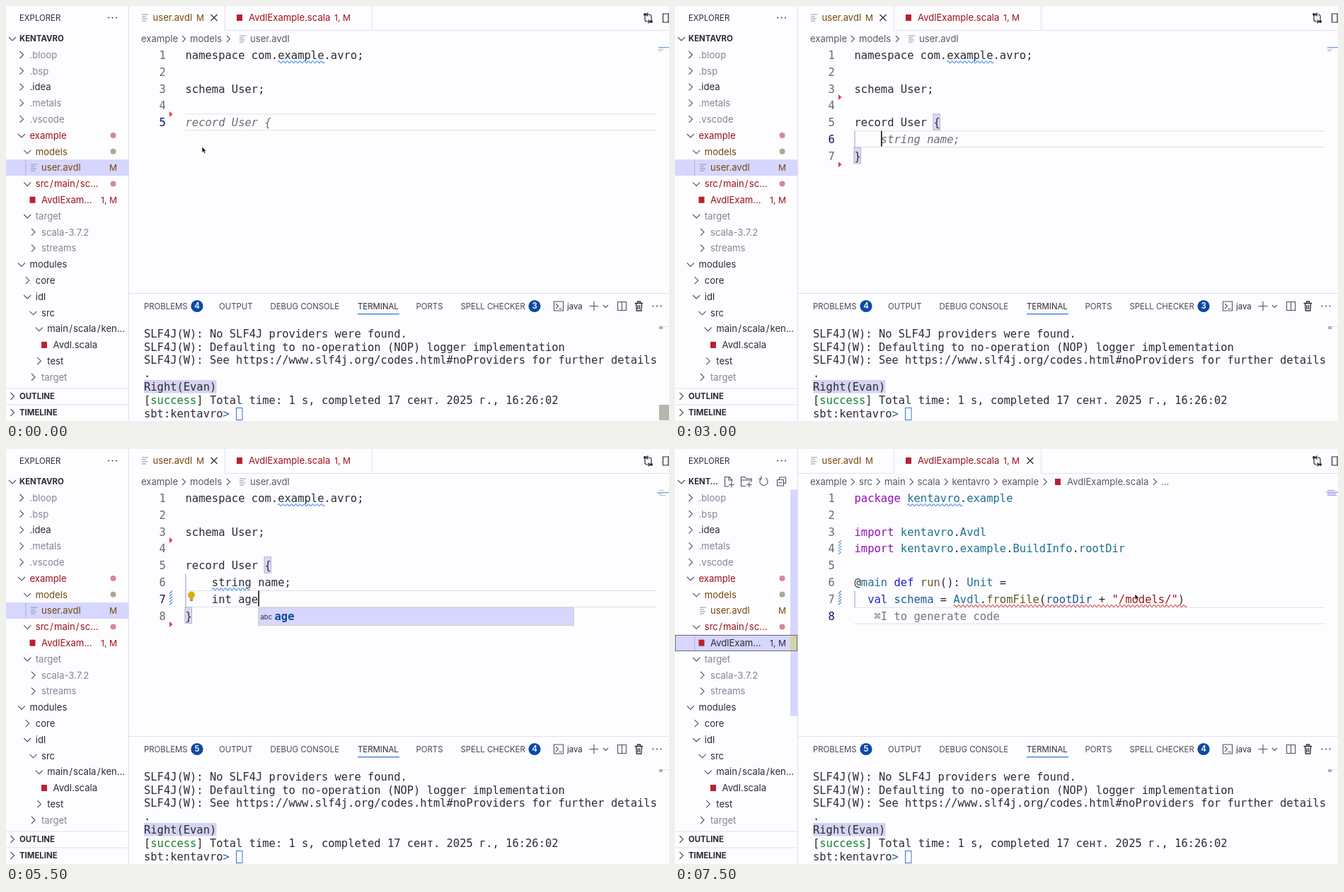
An HTML page for the animation above (8 s loop, 937 by 587 pixels).

```html
<!DOCTYPE html>
<html lang="en">
<head>
<meta charset="utf-8">
<title>Editor session</title>
<style>
html, body { margin: 0; width: 100%; height: 100%; overflow: hidden; background: #fdfdff; }
svg { display: block; width: 937px; height: 587px; }
text { font: 13.1px Inter, sans-serif; fill: #2b2b36; white-space: pre; }
.s { font-size: 11.4px; }
.n { font-size: 12.2px; }
.m { font: 15.5px "DejaVu Sans Mono", monospace; }
.t { font-size: 15.45px; }
.b { font-weight: 700; }
.g { font-style: italic; fill: #6c6c74; }
</style>
</head>
<body>
<svg id="stage" viewBox="0 0 937 587"></svg>
<script>
const INK = '#2b2b36', MUTED = '#848296', RED = '#9c1219', BROWN = '#74480a', EDGE = '#dfdff2',
  SELECT = '#d6d6ff', BLUE = '#3b82f0', ICON = '#50505a', SCALA = '#b8222e';
const CH = 9.33, LEFT = 253.5, ROW = 23.8;

// Drawing helpers
const text = (x, y, s, fill = INK, cls = '') => `<text x="${x}" y="${y}" class="${cls}" style="fill:${fill}">${s}</text>`;
const box = (x, y, w, h, fill, more = '') => `<rect x="${x}" y="${y}" width="${w}" height="${h}" fill="${fill}" ${more}/>`;
const path = (d, stroke = ICON, w = 1.1) => `<path d="${d}" fill="none" stroke="${stroke}" stroke-width="${w}"/>`;
const shape = (d, fill) => `<path d="${d}" fill="${fill}"/>`;
const dot = (x, y, r, fill) => `<circle cx="${x}" cy="${y}" r="${r}" fill="${fill}"/>`;
const span = (fill, s) => `<tspan style="fill:${fill}">${s}</tspan>`;
const ghost = s => `<tspan class="g">${s}</tspan>`;
const chevron = (x, y, open) => path(open ? `M${x - 5} ${y - 2}l5 5 5-5` : `M${x - 2.5} ${y - 5}l5 5-5 5`);
const dots = (x, y) => [-5.5, 0, 5.5].map(d => dot(x + d, y, 1.1, ICON)).join('');
const fileIcon = (x, y) => path(`M${x - 4} ${y - 4.5}h9m-9 3h6m-6 3h8m-8 3h6`, '#92929a', 1);
const scalaIcon = (x, y) => box(x - 4, y - 4.5, 8, 9, SCALA);
const cross = (x, y) => path(`M${x - 4.5} ${y - 4.5}l9 9m0-9l-9 9`, INK, 1.2);
const lineTop = n => 57.7 + ROW * n;
const colX = c => LEFT + CH * c;

function wave(row, from, to, color) {
  let d = `M${colX(from)} ${lineTop(row) + 21.5}`;
  for (let x = colX(from); x < colX(to) - 2; x += 6) d += 'q1.5-3 3 0t3 0';
  return path(d, color, 1.1);
}

function badge(x, n) {
  return dot(x, 424.5, 8.6, '#0b4aa4') + `<text x="${x}" y="428.4" text-anchor="middle" class="s" style="fill:#fff;font-weight:600">${n}</text>`;
}

function bulb(x, y) {
  return dot(x, y - 1.5, 5, '#d9b010') + box(x - 2.5, y + 1.5, 5, 3, '#d9b010') + box(x - 2, y + 4.7, 4, 2, '#77755f');
}

function hatch(row) {
  let d = '';
  for (let y = lineTop(row) + 4; y < lineTop(row + 1); y += 4) d += `M231 ${y}l4-4`;
  return path(d, '#5a94cc', 1.3);
}

function pointer(x, y) {
  return `<path d="M${x} ${y}v8.5l2-1.7 1.5 3 1.5-.8-1.4-2.8h2.6z" fill="#111" stroke="#fff" stroke-width=".7"/>`;
}

// Explorer rows: level, label, kind (> closed, v open, f text file, s scala file), colour, mark
const TREE = [
  [0, '.bloop', '>', MUTED], [0, '.bsp', '>', MUTED], [0, '.idea', '>'], [0, '.metals', '>', MUTED],
  [0, '.vscode', '>', MUTED], [0, 'example', 'v', RED, '#d68898'], [1, 'models', 'v', BROWN, '#aaaa96'],
  [2, 'user.avdl', 'f', BROWN, 'M'], [1, 'src/main/sc…', 'v', RED, '#d68898'],
  [2, 'AvdlExam…', 's', RED, '1, M'], [1, 'target', 'v', MUTED], [2, 'scala-3.7.2', '>', MUTED],
  [2, 'streams', '>', MUTED], [0, 'modules', 'v'], [1, 'core', '>'], [1, 'idl', 'v'], [2, 'src', 'v'],
  [3, 'main/scala/ken…', 'v'], [4, 'Avdl.scala', 's'], [3, 'test', '>'], [2, 'target', '>', MUTED]
];

function explorer({ selected = 7, hover, tools, bar, focus }) {
  let out = text(19, 20.6, 'EXPLORER', INK, 's') + dots(150.5, 16.5) + chevron(9, 46, true) +
    text(19, 50.2, tools ? 'KENT…' : 'KENTAVRO', INK, 's b');
  if (tools) out += path('M76 53h-5.5v-13.5h6l4 4v3m-4.5-7v4.5h4.5M76 50.5h7.5m-3.7-3.7v7.5') +
    path('M100 52.5h-6.5v-13h5l2 2.5h7.5v5M93.5 44h14.5M101 50.5h7.5m-3.7-3.7v7.5') +
    path('M122 41.5a5.6 5.6 0 1 0 6-.5M122 38v4h-4') +
    path('M147.5 43v-3h9v8.5h-3M144.5 43.5h9v8.5h-9zM146.5 47.8h5');
  if (hover) out += box(0, 263, 163, 22.8, '#f3f3fb');
  out += box(0, 57.6 + 22.8 * selected, 173, 22.8, SELECT);
  TREE.forEach(([level, label, kind, color = INK, mark], i) => {
    const x = 33.5 + 8.25 * level, y = 69 + 22.8 * i, fill = focus && i === selected ? INK : color;
    for (let j = 0; j < level; j++)
      if (hover || (i === selected && j === 1)) out += box(19 + 8.25 * j, y - 11.4, 1, 22.8, i === selected && j ? '#b4b4cc' : EDGE);
    out += kind === 'f' ? fileIcon(x - 11, y) : kind === 's' ? scalaIcon(x - 12.5, y) : chevron(x - 11.5, y, kind === 'v');
    out += text(x, y + 4.7, label.replaceAll('/', '\u200a/\u200a'), fill);
    if (mark) out += mark[0] === '#' ? dot(151.5, y, 4, mark)
      : `<text x="157" y="${y + 4.5}" text-anchor="end" class="n" style="fill:${fill}">${mark}</text>`;
  });
  if (bar) out += box(163, 57.5, 10, 320, bar);
  if (focus) out += box(163, 263, 10, 22.5, '#d4d2aa') + box(.5, 263.5, 172, 22, 'none', 'stroke="#6c6c7c"');
  [['OUTLINE', 552], ['TIMELINE', 575]].forEach(([s, y]) =>
    out += box(0, y - 11.5, 173, 1, EDGE) + chevron(9, y, false) + text(19, y + 4.2, s, INK, 's b'));
  return out + box(173, 0, 1, 587, EDGE);
}

function tabs(scala) {
  let out = box(309, 0, 1, 34, EDGE) + box(517, 0, 1, 34, EDGE) + box(517, 34, 420, 1, EDGE) +
    (scala ? box(174, 34, 135, 1, EDGE) : box(309, 34, 208, 1, EDGE)) +
    fileIcon(196, 16.5) + text(207.5, 21.2, 'user.avdl', BROWN) + text(269, 21.2, 'M', BROWN, 'n') +
    scalaIcon(330, 16.5) + text(343, 21.2, 'AvdlExample.scala', RED) + text(464, 21.2, '1, M', RED, 'n') +
    cross(scala ? 502 : 294, 16.5) +
    path('M903 14v5q0 3 3 3h4m-2.5-2.5l2.5 2.5-2.5 2.5M912 20v-5q0-3-3-3h-4m2.5-2.5l-2.5 2.5 2.5 2.5', INK, 1.2) +
    dot(903, 12, 2, INK) + dot(912, 22, 2, INK) + path('M938 11h-9.5v12h9.5m-2-12v12', INK, 1.2);
  const crumb = '#585864';
  const parts = scala
    ? [[191, 'example'], [260, 'src'], [296, 'main'], [342.5, 'scala'], [391.5, 'kentavro'], [462, 'example'], [554, 'AvdlExample.scala'], [687, '…']]
    : [[191, 'example'], [260, 'models'], [345, 'user.avdl']];
  parts.forEach(([x, s]) => out += text(x, 51.2, s, crumb));
  (scala ? [251, 287, 334, 383, 453, 523, 678] : [251, 314]).forEach(x => out += path(`M${x - 2} 42l4.5 4.5-4.5 4.5`, crumb));
  return out + (scala ? scalaIcon(541, 46.5) : fileIcon(334, 46.5));
}

function minimap(kind) {
  if (kind === 2) return path('M922 58.5h10m-10 3h14m-14 2h12', '#a98ad8', 1) + path('M920 61h17M922 65.5h13', '#7d9ef0', 1);
  return path('M923 58.5h7m-8 3h7m-7 2h5', '#b8b8bc', 1) +
    (kind ? box(920, 61, 17, 1.3, '#6f9cf0') + path('M923 65.5h9', '#b8b8bc', 1) : box(922, 58, 15, 1.3, '#6f9cf0'));
}

function panel({ problems = 4, thumb }) {
  let out = box(174, 406, 763, 1, EDGE);
  [[195, 'PROBLEMS'], [301, 'OUTPUT'], [373.5, 'DEBUG CONSOLE'], [497, 'TERMINAL'], [579.5, 'PORTS'], [642.5, 'SPELL CHECKER']]
    .forEach(([x, s]) => out += text(x, 428.6, s, x === 497 ? INK : '#484854', 's'));
  out += box(497, 435, 59, 1.3, '#3b7cd0') + badge(270, problems) + badge(747, problems - 1) +
    path('M774.5 418h13v13h-13zM777 421l3.5 3.5-3.5 3.5M781.5 428.5h4') + text(793, 428.7, 'java', INK, 's') +
    path('M824.5 424.5h13M831 418v13M844 423l3.5 3.5 3.5-3.5') +
    path('M864.5 418.5h12v12h-12zM870.5 418.5v12') +
    path('M888.5 420.5h11.5M892.5 420v-2h4v2M890.5 421l.7 10h6.6l.7-10M893 423v6m2.5-6v6', INK, 1.3) + dots(920, 424.5);
  out += box(195, 529, 102.5, 18.5, '#d4d4f2');
  [
    'SLF4J(W): No SLF4J providers were found.',
    'SLF4J(W): Defaulting to no-operation (NOP) logger implementation',
    'SLF4J(W): See https://www.slf4j.org/codes.html#noProviders for further details',
    '.',
    'Right(Evan)',
    `[${span('#148030', 'success')}] Total time: 1 s, completed 17 сент. 2025 г., 16:26:02`,
    `sbt:kentavro${span('#26608a', '&gt;')} `
  ].forEach((s, i) => out += text(195, 468.7 + 18.85 * i, s, INK, 'm t'));
  out += box(325.5, 568.5, 8.5, 17, 'none', 'stroke="#3a72d0"') + box(923, 453, 5, 4, '#b0b0b4') + box(928, 453, 9, 1, EDGE);
  return thumb ? out + box(923, 564, 14, 22, '#b6b6ac') : out;
}

const AVDL = ['namespace com.example.avro;', '', 'schema User;', ''];
const purple = s => span('#9410b8', s), teal = s => span('#20708e', s), blue = s => span('#2020cc', s),
  name = s => span('#1a5a98', s), method = s => span('#6a5624', s);
const SCALA_CODE = [
  `${purple('package')} ${teal('kentavro')}.${teal('example')}`, '',
  `${purple('import')} ${teal('kentavro')}.${teal('Avdl')}`,
  `${purple('import')} ${teal('kentavro')}.${teal('example')}.${teal('BuildInfo')}.${teal('rootDir')}`, '',
  `@${teal('main')} ${blue('def')} ${method('run')}(): ${teal('Unit')} =`,
  `  ${blue('val')} ${name('schema')} = ${teal('Avdl')}.${method('fromFile')}(${name('rootDir')} + ${span('#961a1a', '"/models/"')})`,
  `   ${span('#74747c', '⌘I to generate code')}`
];

function editor({ code, line, caret, bulbAt, marks = [], brackets, word, indent, edits = [], waves = [], popup }) {
  let out = box(253, lineTop(line - 1) - .5, 666, 1, '#e0e0e6') + box(253, lineTop(line) - 1.5, 666, 1, '#e0e0e6');
  const bracket = (row, col) => box(colX(col) - .5, lineTop(row) - .2, 9.5, 22.5, '#d8d8f6', 'stroke="#b4b4c8"');
  if (brackets) out += bracket(4, 12) + bracket(brackets - 1, 0);
  if (word) out += box(254, 153.5, 55, 22, '#d9d8a4', 'stroke="#84846e"');
  if (indent) out += box(253.5, lineTop(indent[0]), 1, ROW * indent[1], '#9494d0');
  code.forEach((s, i) => {
    const y = 75 + ROW * i;
    out += text(216.5, y, i + 1, i + 1 === line ? '#171160' : '#686874', 'm') + text(LEFT, y, s, INK, 'm');
  });
  waves.forEach(w => out += wave(...w));
  marks.forEach(n => out += shape(`M231 ${lineTop(n) - 4}l4.5 4-4.5 4z`, '#e63a50'));
  edits.forEach(n => out += hatch(n));
  if (bulbAt) out += bulb(...bulbAt);
  if (caret !== undefined) out += box(colX(caret) + .2, lineTop(line - 1), 1.6, 22, '#111');
  if (popup) out += box(356.5, 224.5, 446, 25, SELECT, 'stroke="#d2d2b4"') +
    `<text x="359.5" y="240.5" style="font-size:9.5px">abc</text>` + text(379.5, 242.3, 'age', '#0a4c9c', 'm b');
  return out;
}

const NAME_WAVE = [0, 14, 21, BLUE], FIELD = '    string name;';
const avdl = (rows, line, more) => ({ code: [...AVDL, ...rows], line, waves: [NAME_WAVE], ...more });
const record = (rows, line, more) => avdl(['record User {', ...rows, '}'], line, { brackets: rows.length + 6, ...more });
const field = (row, more) => record([FIELD, '    ' + row], 7, {
  map: 1, problems: 5, indent: [5, 2], edits: [6], marks: [3, 8], waves: [NAME_WAVE, [5, 4, 10, BLUE]], ...more
});
const scala = more => ({
  code: SCALA_CODE, line: 8, map: 2, problems: 5, scala: true, selected: 9, focus: true, tools: true,
  indent: [6, 1], edits: [3, 6], waves: [[0, 8, 16, BLUE], [6, 15, 50, '#d04040']], ...more
});
const GREY = '#b0b0ae', LINE_BULB = [262, 208], GUTTER_BULB = [187, 184];

// One scene per half second
const SCENES = [
  avdl([ghost('record User {')], 5, { marks: [4], thumb: true, mouse: [277, 199] }),
  avdl(['record User {'], 5, { marks: [3, 5], caret: 13 }),
  avdl(['record User ' + span('#e02020', '{')], 5, { marks: [3, 5], bulbAt: [262, 136] }),
  avdl(['record User {', '}'], 6, { marks: [3, 5, 6], caret: 1, bulbAt: GUTTER_BULB }),
  avdl(['record User {', '}'], 5, { marks: [3, 5, 6], caret: 1, word: true, bulbAt: GUTTER_BULB }),
  record([], 5, { caret: 13, marks: [3, 5, 6] }),
  record(['    ' + ghost('string name;')], 6, { caret: 4, indent: [5, 1], marks: [3, 7] }),
  record([FIELD], 6, { caret: 16, indent: [5, 1], marks: [3, 7] }),
  field(ghost('int id;'), { caret: 4 }),
  field('int ' + ghost('id;'), { caret: 8 }),
  field('int a' + ghost('ge;'), { caret: 9 }),
  field('int age', { caret: 11, popup: true, bulbAt: LINE_BULB }),
  field('int age;', { caret: 12, bulbAt: LINE_BULB, tools: true, bar: GREY, mouse: [140, 230] }),
  field('int age;', { bulbAt: LINE_BULB, hover: true, tools: true, bar: GREY, mouse: [91, 268] }),
  scala({ bar: GREY, mouse: [430, 245] }),
  scala({ bar: SELECT, mouse: [650, 205] })
];

const stage = document.getElementById('stage');
let shown = -1;
function tick() {
  const k = Math.floor(performance.now() / 500) % SCENES.length;
  if (k !== shown) {
    const s = SCENES[shown = k];
    stage.innerHTML = explorer(s) + tabs(s.scala) + minimap(s.map || 0) + editor(s) + panel(s) +
      (s.mouse ? pointer(...s.mouse) : '');
  }
  requestAnimationFrame(tick);
}
tick();
</script>
</body>
</html>
```
